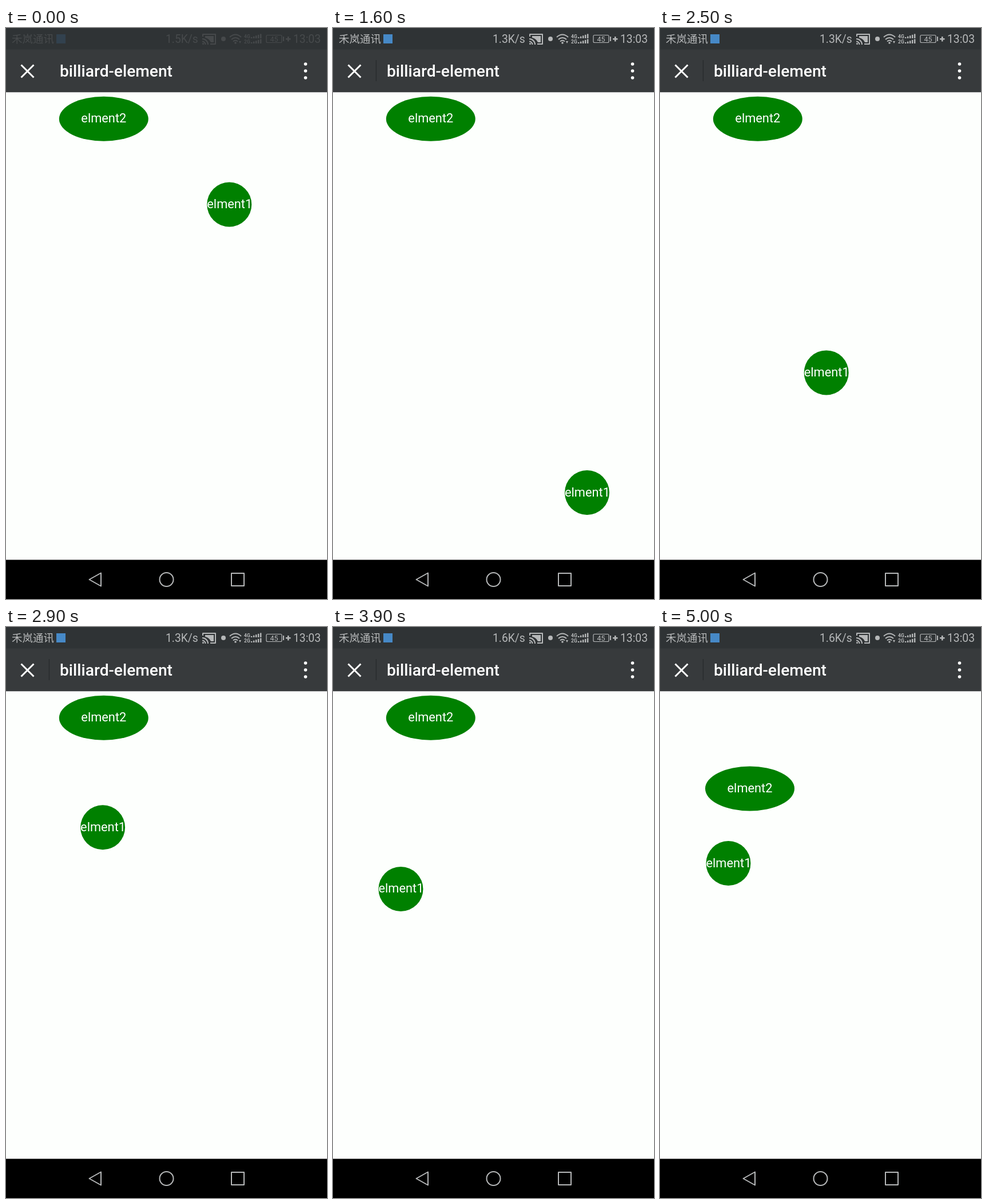
These frames come from a looping animation (561x998 px, 5.1 s). An HTML page:

```html
<!DOCTYPE html>
<html lang="en">
<head>
<meta charset="utf-8">
<title>billiard-element</title>
<style>
  html, body { margin: 0; width: 100%; height: 100%; overflow: hidden; background: #fdfffd; }
  svg { display: block; width: 561px; height: 998px; font-family: Roboto, "Noto Sans CJK SC", "Noto Sans CJK", sans-serif; }
  .line { fill: none; stroke: #b6b8b9; stroke-width: 2; stroke-linejoin: round; }
  .element { fill: green; }
  .element text { fill: #fff; font-size: 21.8px; }
</style>
</head>
<body>
<svg viewBox="0 0 561 998">
  <rect width="561" height="998" fill="#fdfffd"/>

  <g class="element" id="circle"><circle r="39"/><text x="-39" y="6.500">elment1</text></g>
  <g class="element" id="oval"><ellipse rx="78" ry="39"/><text y="6.500" text-anchor="middle">elment2</text></g>

  <rect width="561" height="112.300" fill="#373a3c"/>
  <rect width="561" height="37.400" fill="#2f3335"/>

  <g id="status" fill="#b6b8b9">
    <text x="10" y="26" font-size="18.500">禾岚通讯</text>
    <rect x="88" y="11" width="16" height="16" fill="#4689c7"/>
    <text id="speed" x="279" y="26" font-size="19.300"></text>
    <!-- cast -->
    <path class="line" d="M344 15V11H366V28H357"/>
    <path d="M348 14H363V25H358A14 14 0 0 0 348 17Z"/>
    <path class="line" d="M343 19A10 10 0 0 1 353 29M343 23.500A5.500 5.500 0 0 1 348.500 29"/>
    <circle cx="344.500" cy="27.500" r="1.500"/>
    <circle cx="380" cy="19" r="4"/>
    <!-- wireless -->
    <path class="line" d="M391 16Q401 7 411 16M394 20Q401 14 408 20M397 23.500Q401 20 405 23.500"/>
    <circle cx="401" cy="26" r="1.800"/>
    <path d="M407 23h4l-2 4z"/>
    <g font-size="8.500" font-weight="700"><text x="416" y="18">4G</text><text x="416" y="27">2G</text></g>
    <g id="bars"></g>
    <!-- battery -->
    <rect class="line" x="455" y="12.500" width="27" height="13" rx="2" style="stroke-width:1.2"/>
    <text x="468.500" y="23.500" font-size="12.500" text-anchor="middle">45</text>
    <path d="M484 15h2v8h-2zM489 18h3v-3h2.500v3h3v2.500h-3v3h-2.500v-3h-3z"/>
    <text x="502" y="26" font-size="19.300">13:03</text>
  </g>
  <path id="divider" d="M75.500 56V93" stroke="#292c2e" stroke-width="1.500"/>

  <path d="M26.500 64.500L48.500 86.500M48.500 64.500L26.500 86.500" stroke="#fff" stroke-width="3"/>
  <text x="94" y="85" font-size="28.200" font-weight="500" fill="#fff">billiard-element</text>
  <g fill="#fff"><circle cx="523.500" cy="63" r="2.800"/><circle cx="523.500" cy="75" r="2.800"/><circle cx="523.500" cy="87" r="2.800"/></g>

  <rect y="929.500" width="561" height="69"/>
  <path class="line" d="M145.500 964L166 952.500V975.500Z"/>
  <circle class="line" cx="280.500" cy="964" r="12"/>
  <rect class="line" x="394" y="953" width="22" height="22"/>
</svg>
<script>
const LOOP = 5100, STEP = 100;
const TOP = 229, BOTTOM = 812;
const byId = id => document.getElementById(id);

const progress = (time, start, end) => Math.min(1, Math.max(0, (time - start) / (end - start)));
const easeOut = (k, power) => 1 - (1 - k) ** power;
const mix = (a, b, k) => a + (b - a) * k;

// Folds a straight run back and forth between two walls.
function bounce(value, low, high) {
  const span = high - low;
  const offset = Math.abs(value - low) % (2 * span);
  return low + Math.min(offset, 2 * span - offset);
}

// Dragged into the corner, then thrown up and to the left until friction stops it.
function circleAt(time) {
  const left = 117.5, right = 444;
  if (time < 1600) {
    const drag = progress(time, 1200, 1600);
    return [mix(390.3, right, drag), mix(308.5, BOTTOM, drag)];
  }
  const runX = 7 * (right - left) + 2, runY = 2731;
  return [
    bounce(right - runX * easeOut(progress(time, 1600, 3910), 1.42), left, right),
    bounce(BOTTOM - runY * easeOut(progress(time, 1600, 4075), 1.55), TOP, BOTTOM)
  ];
}

// Dragged to the lower right, then thrown; still moving when the loop ends.
function ovalAt(time) {
  const left = 157, right = 453.5, releaseY = 750.5;
  if (time < 4300) {
    const drag = easeOut(progress(time, 4100, 4300), 1.7);
    return [mix(170.8, right, drag), mix(158.8, releaseY, drag)];
  }
  const flight = progress(time, 4300, 5000);
  return [
    bounce(right - 3 * (right - left) * flight, left, right),
    bounce(releaseY - 1741 * flight, TOP, BOTTOM)
  ];
}

const place = (id, point) => byId(id).setAttribute("transform", `translate(${point})`);

byId("bars").innerHTML = [18, 27].map(base =>
  [0, 1, 2, 3, 4].map(i => {
    const height = 2 + i * 1.4;
    return `<rect x="${428 + i * 4}" y="${base - height}" width="2.4" height="${height}"/>`;
  }).join("")).join("");

function draw(now) {
  const time = Math.floor(now % LOOP / STEP) * STEP;
  const reveal = progress(time, 0, 500);
  byId("status").setAttribute("opacity", mix(0.17, 1, reveal));
  byId("divider").setAttribute("opacity", reveal);
  byId("speed").textContent = (time < 800 ? "1.5" : time < 3900 ? "1.3" : "1.6") + "K/s";
  place("circle", circleAt(time));
  place("oval", ovalAt(time));
}

let start;
function tick(now) {
  start ??= now;
  draw(now - start);
  requestAnimationFrame(tick);
}
draw(0);
requestAnimationFrame(tick);
</script>
</body>
</html>
```
